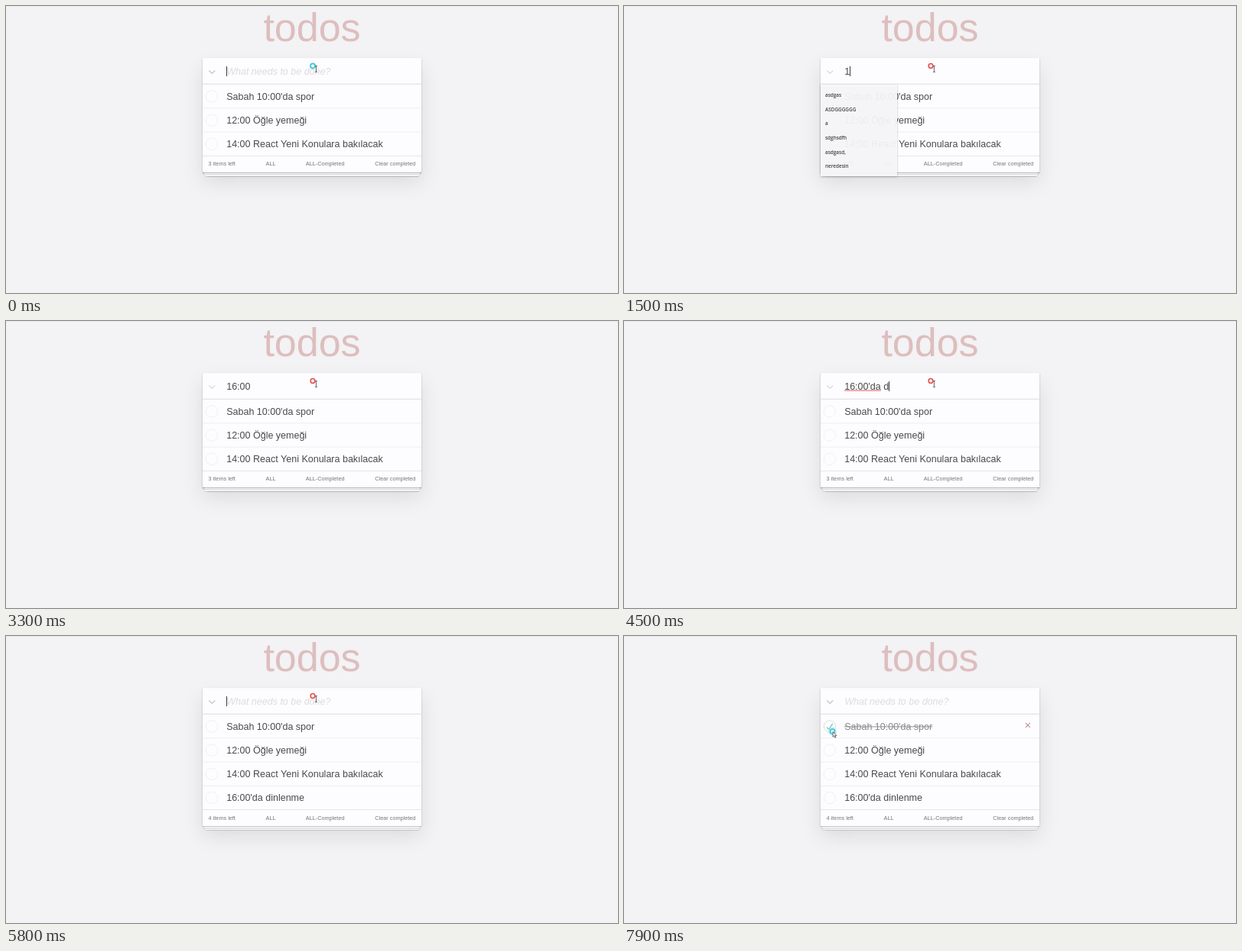
Animation of 800 by 376 pixels, one loop 8 s. Source, as an HTML page with a canvas:

```html
<!DOCTYPE html>
<html lang="tr">
<head>
<meta charset="utf-8">
<title>todos</title>
<style>
  html, body { margin: 0; width: 100%; height: 100%; overflow: hidden; background: #f3f2f4; }
  canvas { display: block; }
</style>
</head>
<body>
<canvas id="stage" width="800" height="376"></canvas>
<script>
const ctx = document.getElementById('stage').getContext('2d');
const LOOP = 8000, STEP = 100;
const SANS = '"Liberation Sans", Arial, sans-serif';
const BODY = '12.5px ' + SANS;
const LEFT = 257, WIDTH = 286, TOP = 68.2, LIST = 102.8, ROW = 31.2, FOOT = 21.6;
const TEXT_X = 288.2, INPUT_Y = 89.7;

const ENTRY = "16:00'da dinlenme";
const KEYS = [1500, 1800, 2000, 2600, 2800, 3600, 3800, 3900, 4000,
  4500, 4600, 4800, 5000, 5200, 5300, 5500, 5600];
const SUBMIT = 5800, CHECK = 7800;
const TODOS = ["Sabah 10:00'da spor", '12:00 Öğle yemeği', '14:00 React Yeni Konulara bakılacak'];
const HISTORY = ['asdgas', 'ASDGGGGGG', 'a', 'sdghsdfh', 'asdgasd,', 'neredesin'];
const CARET_OFF = [[500, 1100], [3300, 3600], [6100, 6600], [7100, 7600], [CHECK, LOOP]];
// time, x, y of the pointer
const PATH = [[0, 401, 78.5], [6600, 401, 78.5], [6700, 400, 83], [6800, 397, 91], [6900, 397, 91],
  [7000, 372, 106], [7100, 336, 118], [7200, 310.5, 123.5], [7500, 285, 124.5], [7700, 272.5, 125], [8000, 272.5, 125]];

const between = (t, [a, b]) => t >= a && t < b;

// linear lookup in rows of [time, ...values]
function track(rows, t) {
  const i = Math.max(1, rows.findIndex(r => r[0] >= t));
  const a = rows[i - 1], b = rows[i];
  const k = (t - a[0]) / (b[0] - a[0]);
  return a.slice(1).map((v, j) => v + (b[j + 1] - v) * k);
}

function text(str, x, y, font, color, align = 'left') {
  ctx.font = font;
  ctx.fillStyle = color;
  ctx.textAlign = align;
  ctx.fillText(str, x, y);
}

function rect(x, y, w, h, color) {
  ctx.fillStyle = color;
  ctx.fillRect(x, y, w, h);
}

function line(points, color, width) {
  ctx.beginPath();
  points.forEach(([x, y]) => ctx.lineTo(x, y));
  ctx.strokeStyle = color;
  ctx.lineWidth = width;
  ctx.stroke();
}

function disc(x, y, r, fill, stroke, width) {
  ctx.beginPath();
  ctx.arc(x, y, r, 0, Math.PI * 2);
  if (fill) { ctx.fillStyle = fill; ctx.fill(); }
  if (stroke) { ctx.strokeStyle = stroke; ctx.lineWidth = width; ctx.stroke(); }
}

function shadowRect(x, y, w, h, fill, dy, blur, alpha) {
  ctx.save();
  ctx.shadowColor = `rgba(0,0,0,${alpha})`;
  ctx.shadowOffsetY = dy;
  ctx.shadowBlur = blur;
  rect(x, y, w, h, fill);
  ctx.restore();
}

function drawCard(bottom) {
  const h = bottom - TOP, paper = '#f7f6f8';
  shadowRect(LEFT, TOP, WIDTH, h, paper, 13, 26, 0.1);
  shadowRect(LEFT, TOP, WIDTH, h, paper, 1, 2.1, 0.2);
  for (const [inset, drop] of [[3.1, 5.2], [1.6, 2.6]]) {
    shadowRect(LEFT + inset, bottom - 10, WIDTH - 2 * inset, 10 + drop, paper, 0.5, 1, 0.28);
  }
  shadowRect(LEFT, TOP, WIDTH, h, '#fdfcfe', 0.5, 0.6, 0.25);
}

function drawInput(t, typed, empty) {
  rect(LEFT, LIST - 1.6, WIDTH, 1, '#f4f3f5');
  rect(LEFT, LIST - 0.8, WIDTH, 0.9, '#e2e1e3');
  line([[265.3, 84.4], [269.3, 88.2], [273.3, 84.4]], empty ? '#c9c8ca' : '#dddcde', 1.4);
  if (empty) text('What needs to be done?', TEXT_X, INPUT_Y, 'italic ' + BODY, '#dcdbdd');
  else text(typed, TEXT_X, INPUT_Y, BODY, '#4a4a4a');
  ctx.font = BODY;
  if (typed.includes(' ')) {
    rect(TEXT_X, 90.6, ctx.measureText(typed.split(' ')[0]).width, 1, '#e4605e');
  }
  if (!CARET_OFF.some(span => between(t, span))) {
    rect(Math.round(TEXT_X + ctx.measureText(typed).width - 0.2), 79, 1, 13, '#3c3c3c');
  }
}

function drawToggle(y, done) {
  disc(268.9, y, 7.7, null, done ? '#bddad5' : '#ebeaed', 0.7);
  if (!done) return;
  ctx.save();
  ctx.translate(268.9, y);
  ctx.scale(0.154, 0.154);
  ctx.translate(-50, -50);
  ctx.fillStyle = '#5aa99c';
  ctx.fill(new Path2D('M72 25L42 71 27 56l-4 4 20 20 34-52z'));
  ctx.restore();
}

function drawItem(label, i, t) {
  const top = LIST + i * ROW, base = top + 19.8;
  const done = i === 0 && t >= CHECK;
  const grey = done ? Math.round(77 + 0.6 * (t - CHECK)) : 74;
  const color = `rgb(${grey},${grey},${grey})`;
  if (i) rect(LEFT, top - 0.5, WIDTH, 0.8, '#ebeaec');
  drawToggle(top + 15.6, done);
  text(label, TEXT_X, base, BODY, color);
  if (done) rect(TEXT_X, base - 4.2, ctx.measureText(label).width, 0.9, color);
  if (i === 0 && t >= 7000) {
    line([[524.8, 113.9], [530.8, 119.9]], '#c59595', 1.2);
    line([[530.8, 113.9], [524.8, 119.9]], '#c59595', 1.2);
  }
}

function drawFooter(top, count) {
  const font = '7.3px ' + SANS, y = top + 12.9, color = '#777';
  rect(LEFT, top - 0.5, WIDTH, 0.9, '#e4e3e5');
  text(count + ' items left', 264.6, y, font, color);
  text('ALL', 339.6, y, font, color);
  text('ALL-Completed', 391.8, y, font, color);
  text('Clear completed', 535.4, y, font, color, 'right');
}

function drawHistory(t) {
  const [alpha] = track([[0, 0], [100, 0.35], [200, 0.8], [300, 1], [1400, 1],
    [1500, 0.92], [1600, 0.5], [1700, 0.12], [1800, 0], [LOOP, 0]], t);
  if (t < 100 || alpha <= 0) return;
  ctx.save();
  ctx.globalAlpha = alpha;
  shadowRect(LEFT, 103, 100, 120.3, '#fcfbfd', 0.6, 2, 0.35);
  HISTORY.forEach((word, i) =>
    text(word, 263, 119.2 + i * 18.6, '600 6.4px "Open Sans", "Noto Sans", sans-serif', '#333'));
  ctx.restore();
}

function drawPointer(t) {
  const [x, y] = track(PATH, t);
  const press = t < 200 ? t : t >= CHECK ? t - CHECK : -1;
  if (press >= 0) {
    disc(x, y, press ? 5.4 : 4.4, 'rgba(70,205,225,0.32)');
    disc(x, y, 3, '#e4f6f9', '#35c3d8', 1.5);
  } else {
    disc(x, y, 2.9, '#fbe9e9', '#e2504e', 1.5);
  }
  if (t < 7000) {
    const cx = x + 4.4, cy = y + 4;
    line([[cx, cy - 3.8], [cx, cy + 3.8]], '#555', 0.9);
    for (const dy of [-3.9, 3.9]) line([[cx - 1.6, cy + dy], [cx + 1.6, cy + dy]], '#555', 0.8);
  } else {
    ctx.save();
    ctx.translate(x + 0.6, y + 0.4);
    const arrow = new Path2D('M0 0V6.8L1.6 5.4L2.7 7.8L3.8 7.3L2.7 5H4.8Z');
    ctx.fillStyle = '#fff';
    ctx.fill(arrow);
    ctx.strokeStyle = '#444';
    ctx.lineWidth = 0.8;
    ctx.stroke(arrow);
    ctx.restore();
  }
}

function draw(t) {
  const added = t >= SUBMIT;
  const items = added ? [...TODOS, ENTRY] : TODOS;
  const typed = added ? '' : ENTRY.slice(0, KEYS.filter(k => k <= t).length);
  const footTop = LIST + items.length * ROW;

  rect(0, 0, 800, 376, '#f3f2f4');
  rect(0, 0, 800, 1, '#e9e8ea');
  text('todos', 400, 46, '52px ' + SANS, '#ddbebe', 'center');
  drawCard(footTop + FOOT);
  drawInput(t, typed, !typed);
  items.forEach((label, i) => drawItem(label, i, t));
  drawFooter(footTop, items.length);
  drawHistory(t);
  drawPointer(t);
}

const start = performance.now();
function tick() {
  const t = (performance.now() - start) % LOOP;
  draw(Math.floor(t / STEP) * STEP);
  requestAnimationFrame(tick);
}
tick();
</script>
</body>
</html>
```
